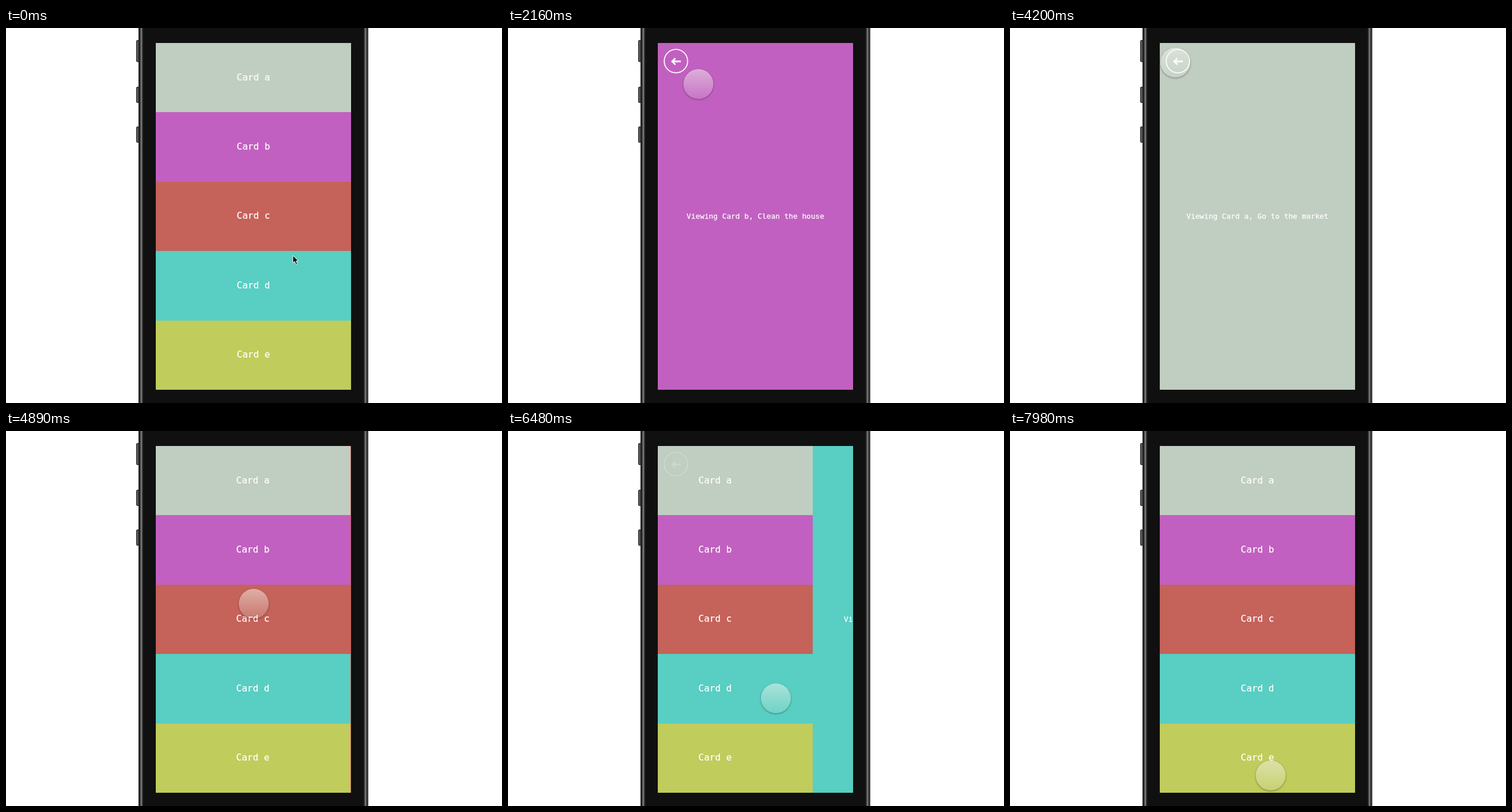
Animation of 861x651 px, one loop 8 s. Source, as an HTML page:

```html
<!DOCTYPE html>
<html lang="en">
<head>
<meta charset="utf-8">
<title>Card list</title>
<style>
  html, body { margin: 0; width: 100%; height: 100%; overflow: hidden; background: #fff; }
  body { position: relative; font: 16px "DejaVu Sans Mono", monospace; color: #fff; }
  div, svg { position: absolute; }

  .phone {
    left: 230px; top: 0; width: 399px; height: 651px;
    background: linear-gradient(90deg,
      #1c1c1c 1px, #333 3px, #8c8c8f 5px, #2a2a2b 7px, #101010 9px 390px,
      #2a2a2b 392px, #8c8c8f 394px, #2a2a2b 396px, #444 398px);
  }
  .key {
    left: 226px; width: 3px; border: 1px solid #1c1c1c; border-radius: 2px 0 0 2px;
    background: #58585b;
  }
  .screen { left: 260px; top: 26px; width: 339px; height: 602px; overflow: hidden; }
  .track { inset: 0; }
  .card, .view {
    box-sizing: border-box; width: 100%; padding-bottom: 2px;
    display: flex; align-items: center; justify-content: center;
    white-space: pre; -webkit-text-stroke: .25px #fff;
  }
  .card { height: 20%; }
  .view { left: 100%; height: 100%; font-size: 12.8px; }

  .back { left: 270px; top: 36px; fill: none; stroke: #fff; }
  .touch {
    left: -26px; top: -26px; width: 52px; height: 52px; border-radius: 50%;
    background: linear-gradient(rgba(245, 245, 238, .52), rgba(240, 240, 235, .14));
    box-shadow: 0 1px 3px rgba(40, 40, 40, .5);
  }
  .arrow { left: 497px; top: 394px; }
</style>
</head>
<body>
  <div class="key" style="top:21px;height:36px"></div>
  <div class="key" style="top:102px;height:26px"></div>
  <div class="key" style="top:171px;height:26px"></div>
  <div class="phone"></div>
  <div class="screen"><div class="track"><div class="view"></div></div></div>

  <svg class="back" width="43" height="43">
    <circle cx="21.5" cy="21.5" r="20.3" stroke-width="1.8"/>
    <path d="M30 22H15M20.5 16.5L15 22L20.5 27.5" stroke-width="2.8"/>
  </svg>
  <svg class="arrow" width="14" height="20">
    <path d="M1 1V14L4 11.2L6.5 16.5L8.8 15.5L6.4 10.4H10.5Z" stroke="#fff"/>
  </svg>
  <div class="touch"></div>

<script>
  const LOOP = 8000, SLIDE = 400, REST = 150, WIDTH = 339;
  const colors = { a: '#c0cdc1', b: '#c160c0', c: '#c56259', d: '#59cec2', e: '#c0cc5b' };

  // Each visit taps a card at x, y, shows its page, then taps the back button.
  const visits = [
    { card: 'b', todo: 'Clean the house', x: 413, y: 168, open: 1630, close: 2560 },
    { card: 'a', todo: 'Go to the market', x: 304, y: 112, open: 3300, close: 4240 },
    { card: 'c', todo: 'Tune a guitar', x: 430, y: 300, open: 4880, close: 5820 },
    { card: 'd', todo: 'Eat some pizza', x: 465, y: 464, open: 6364, close: 7280 },
  ];
  const stops = [
    { at: 400, x: 498, y: 395 },
    ...visits.flatMap(({ x, y, open, close }) => [
      { at: open, x, y },
      { at: close, x: 287, y: 60 },
    ]),
    { at: LOOP, x: 452.5, y: 598 },
  ];

  const find = selector => document.querySelector(selector);
  const [track, view, back, arrow, touch] =
    ['.track', '.view', '.back', '.arrow', '.touch'].map(find);

  Object.entries(colors).forEach(([name, color], i) => {
    const card = document.createElement('div');
    card.className = 'card';
    card.textContent = `Card ${name}`;
    card.style.cssText = `top:${i * 20}%;background:${color}`;
    track.append(card);
  });

  const ease = p => {
    p = Math.min(1, Math.max(0, p));
    return p * p * (3 - 2 * p);
  };
  const mix = (a, b, p) => a + (b - a) * p;

  function showPage(t) {
    const visit = visits.findLast(v => v.open <= t) || visits[0];
    const shown = ease((t - visit.open) / SLIDE) - ease((t - visit.close) / SLIDE);
    view.textContent = `Viewing Card ${visit.card}, ${visit.todo}`;
    view.style.background = colors[visit.card];
    track.style.transform = `translateX(${-Math.round(WIDTH * shown)}px)`;
    back.style.opacity = shown;
  }

  function moveTouch(t) {
    const next = Math.max(1, stops.findIndex(s => s.at > t));
    const from = stops[next - 1], to = stops[next];
    const p = ease((t - from.at - REST) / (to.at - from.at - 2 * REST));
    touch.style.transform = `translate(${mix(from.x, to.x, p)}px, ${mix(from.y, to.y, p)}px)`;
    const moving = t > stops[0].at + REST;
    touch.style.opacity = moving ? 1 : 0;
    arrow.style.opacity = moving ? 0 : 1;
  }

  function draw(now) {
    const t = now % LOOP;
    showPage(t);
    moveTouch(t);
    requestAnimationFrame(draw);
  }
  draw(0);
</script>
</body>
</html>
```
